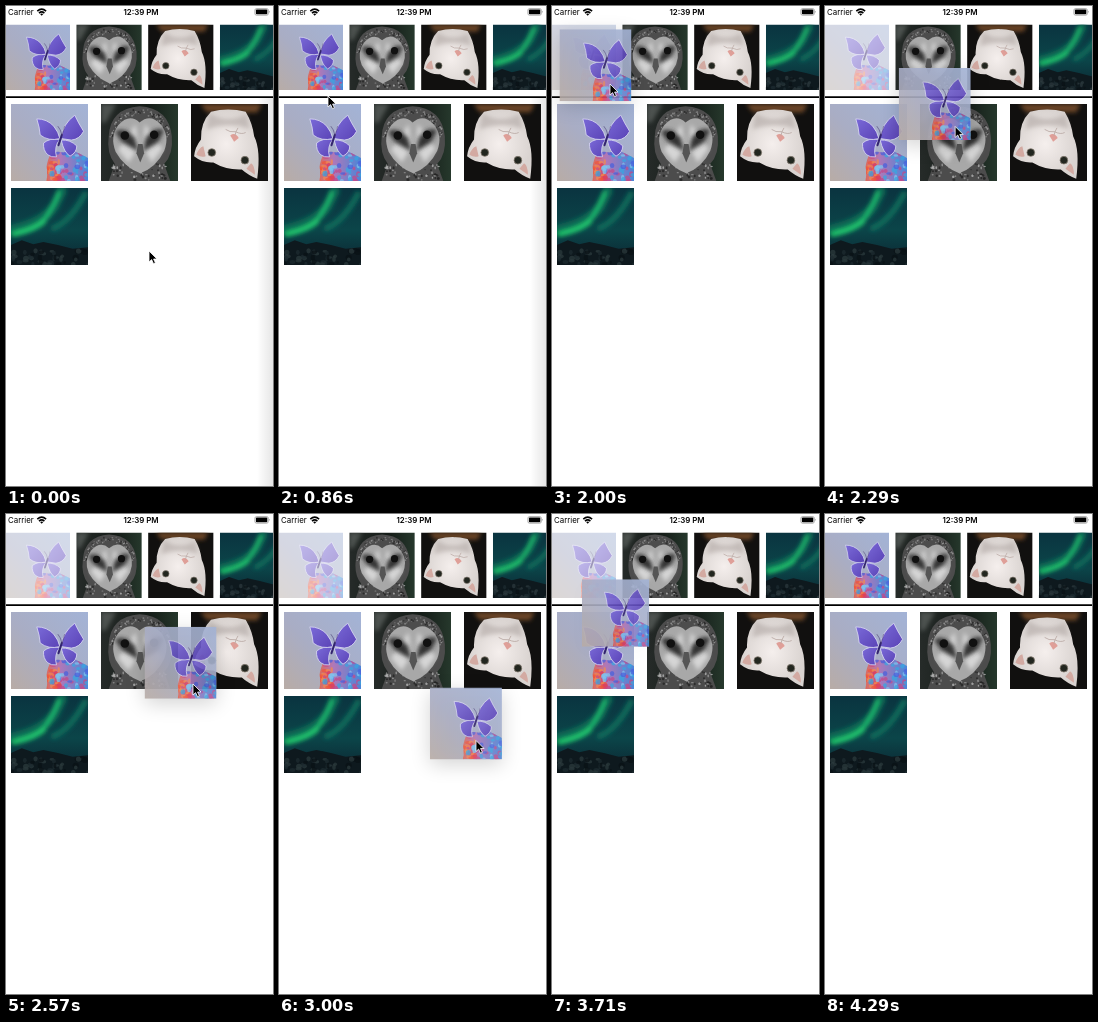
An HTML page that plays this animation: 267 px wide and 480 px high, repeating every 4.44 s.

```html
<!DOCTYPE html>
<html lang="en">
<head>
<meta charset="utf-8">
<title>Drag and drop</title>
<style>
  html, body { margin: 0; width: 100%; height: 100%; overflow: hidden; background: #fff; }
  svg { display: block; width: 100%; height: 100%; }
  text { font: 7.9px Inter, "Liberation Sans", sans-serif; }
  .clock { font-weight: 600; text-anchor: middle; }
</style>
</head>
<body>
<svg viewBox="0 0 267 480">
  <defs>
    <linearGradient id="edge"><stop stop-opacity="0"/><stop offset="1" stop-opacity=".1"/></linearGradient>
    <linearGradient id="haze" x1="1" y1="0" x2="0" y2="1">
      <stop stop-color="#a3b3d6"/><stop offset=".55" stop-color="#a9adc4"/><stop offset="1" stop-color="#b8aca6"/>
    </linearGradient>
    <linearGradient id="wing" x2="1" y2="1"><stop stop-color="#7a6ad8"/><stop offset="1" stop-color="#5a43b6"/></linearGradient>
    <linearGradient id="petal"><stop stop-color="#e8683f"/><stop offset=".4" stop-color="#b078b8"/><stop offset="1" stop-color="#4a86d8"/></linearGradient>
    <linearGradient id="forest"><stop stop-color="#262b29"/><stop offset=".6" stop-color="#141b17"/><stop offset="1" stop-color="#26382c"/></linearGradient>
    <linearGradient id="night" x2="0" y2="1"><stop stop-color="#0a3440"/><stop offset=".55" stop-color="#0b4549"/><stop offset="1" stop-color="#0c2430"/></linearGradient>
    <radialGradient id="fur"><stop stop-color="#f5efed"/><stop offset="1" stop-color="#d9d3d0"/></radialGradient>
    <filter id="soft" x="-50%" y="-50%" width="200%" height="200%"><feGaussianBlur stdDeviation="3"/></filter>
    <filter id="cast" x="-60%" y="-60%" width="220%" height="220%"><feGaussianBlur stdDeviation="10"/></filter>
    <clipPath id="flower"><path d="M46 100Q48 90 46 81Q48 72 51 65Q58 60 68 63Q80 58 88 64L100 70V100z"/></clipPath>

    <symbol id="butterfly" viewBox="0 0 100 100">
      <path fill="url(#haze)" d="M0 0h100v100H0z"/>
      <g clip-path="url(#flower)">
        <path fill="url(#petal)" d="M40 50h60v50H40z"/>
        <g id="petals"></g>
      </g>
      <g transform="translate(8 6) scale(.88 .95)">
        <g fill="url(#wing)" stroke="#d9d8f2" stroke-width="1.2" stroke-linejoin="round">
          <path d="M63 42Q54 52 58 66Q50 67 45 63Q38 57 39 47Q48 40 63 42z"/>
          <path d="M65 43Q78 42 88 51Q88 60 78 65Q69 60 65 43z"/>
          <path d="M63 41Q46 45 34 36Q33 25 29 14Q44 14 54 24Q61 32 63 41z"/>
          <path d="M65 41Q67 21 85 9Q90 19 98 31Q92 42 80 43z"/>
        </g>
        <path stroke="#33246f" stroke-width="3" stroke-linecap="round" d="M66 36L61 50"/>
        <path fill="none" stroke="#46386f" stroke-width=".8" d="M66 36Q64 28 60 24M66 36Q69 30 70 24"/>
      </g>
    </symbol>

    <symbol id="owl" viewBox="0 0 100 100">
      <path fill="url(#forest)" d="M0 0h100v100H0z"/>
      <path fill="#8a908c" opacity=".4" filter="url(#soft)" d="M0 0h20L6 24H0z"/>
      <path fill="#4c4c4c" d="M10 42Q12 6 50 3Q88 5 92 42Q94 66 82 78L90 100H10L18 78Q7 64 10 42z"/>
      <g id="plumage"></g>
      <path fill="#a8a8a8" d="M50 24Q37 12 23 27Q11 42 19 62Q30 82 51 90Q72 82 82 61Q90 41 77 26Q64 12 50 24z"/>
      <path fill="#d6d6d6" filter="url(#soft)" d="M45 26L49 56 36 76 22 60z M57 26L54 56 66 76 80 58z"/>
      <g fill="#333" filter="url(#soft)">
        <path d="M18 36Q30 28 44 44L49 62 28 50z M82 34Q70 28 58 44L54 62 74 50z"/>
      </g>
      <g fill="#111"><circle cx="31" cy="41" r="5.5"/><circle cx="69" cy="40" r="5.5"/></g>
      <path fill="#555" d="M48 52h6l2 12-5 12-5-12z"/>
    </symbol>

    <symbol id="cat" viewBox="0 0 100 100">
      <path fill="#11100f" d="M0 0h100v100H0z"/>
      <path fill="#6b4526" filter="url(#soft)" d="M12 0H92L86 11 20 10z"/>
      <path fill="url(#fur)" d="M26 10Q48 4 71 10Q80 25 82 42Q91 60 86 97Q75 93 66 85Q46 86 29 76Q15 77 4 68Q5 56 13 46Q12 24 26 10z"/>
      <path fill="#d3aaa2" d="M7 66Q10 57 16 55L19 68Q13 70 7 66z M83 92Q83 80 78 77L72 84z"/>
      <path fill="#a89f9b" opacity=".5" filter="url(#soft)" d="M24 12Q45 26 72 14L76 32Q50 23 20 33z"/>
      <g fill="#22261f" stroke="#857c72"><circle cx="27" cy="63" r="5"/><circle cx="70" cy="73" r="5"/></g>
      <path fill="#df9f98" d="M51 41Q57 36 62 44L56 49z"/>
      <path fill="none" stroke="#b5a49f" d="M57 41Q58 36 61 31M58 36Q50 37 45 33M58 36Q66 40 71 37"/>
    </symbol>

    <symbol id="aurora" viewBox="0 0 100 100">
      <path fill="url(#night)" d="M0 0h100v100H0z"/>
      <g fill="none" filter="url(#soft)" stroke-linecap="round">
        <path stroke="#0d6a55" stroke-width="13" d="M2 54Q40 46 56 24L66 4"/>
        <path stroke="#0f6a5a" stroke-width="8" d="M56 52Q78 42 96 8"/>
        <path stroke="#1cbf66" stroke-width="7" d="M4 60Q30 54 42 44"/>
        <path stroke="#22c872" stroke-width="4" d="M10 57Q36 54 47 36T62 6"/>
      </g>
      <path fill="#0e191e" d="M0 74L14 68 29 73 42 70 61 74 80 79 100 77V100H0z"/>
      <g id="rocks"></g>
    </symbol>
  </defs>

  <path fill="#fff" d="M0 0h267v480H0z"/>
  <path id="shade" fill="url(#edge)" d="M251 92h16v388h-16z"/>

  <text x="2" y="8.8">Carrier</text>
  <text class="clock" x="135" y="8.8">12:39 PM</text>
  <g fill="none" stroke="#000" stroke-width="1.6">
    <path d="M31.3 5.2Q35.7 1.2 40.1 5.2M33 7.1Q35.7 4.7 38.4 7.1"/>
    <path fill="#000" stroke="none" d="M35.7 9.7L34.1 8Q35.7 6.8 37.3 8z"/>
  </g>
  <rect x="248.9" y="2.6" width="13.4" height="6.6" rx="1.6" fill="none" stroke="#777" stroke-width=".6"/>
  <rect x="249.9" y="3.6" width="11.4" height="4.6" rx=".8"/>
  <path fill="#777" d="M263 4.8q1.3 1.1 0 2.2z"/>

  <g id="cells"></g>
  <path d="M0 90.3h267v1.8H0z"/>

  <g id="lifted">
    <rect id="shadow" y="5" width="72" height="72" filter="url(#cast)"/>
    <use href="#butterfly" width="72" height="72" opacity=".9"/>
  </g>
  <path id="cursor" stroke="#fff" stroke-width=".8" d="M0 0V11L2.6 8.6 4.5 12.7 6.4 11.8 4.6 8H8z"/>
</svg>
<script>
  const LOOP = 4440, FPS = 7, RELEASE = 3430, LANDED = 4290;
  const HOME = { x: -1.5, y: 18.5, size: 65.5 }, HELD_SIZE = 72;
  const $ = id => document.getElementById(id);

  function add(parent, tag, attrs) {
    const node = document.createElementNS('http://www.w3.org/2000/svg', tag);
    for (const key in attrs) node.setAttribute(key, attrs[key]);
    return parent.appendChild(node);
  }

  // Photo grid: a scrolling strip above, three columns below
  const cell = (name, x, y, size) =>
    add($('cells'), 'use', { href: '#' + name, x, y, width: size, height: size });
  const photos = ['butterfly', 'owl', 'cat', 'aurora'];
  const strip = photos.map((name, i) => cell(name, HOME.x + 71.8 * i, HOME.y, HOME.size));
  photos.forEach((name, i) => cell(name, 5 + 90 * (i % 3), 98 + 84 * Math.floor(i / 3), 77));
  const origin = strip[0];

  // Seeded texture
  let seed = 7;
  const rand = (a, b) => {
    seed = seed * 16807 % 2147483647;
    return a + (b - a) * seed / 2147483647;
  };
  function speckle(id, count, size, colors, place) {
    for (let i = 0; i < count; i++) {
      const [cx, cy] = place();
      const fill = colors[Math.floor(rand(0, colors.length))];
      add($(id), 'ellipse', { cx, cy, rx: rand(.4, 1) * size, ry: rand(.4, 1) * size, fill, opacity: .75 });
    }
  }
  speckle('petals', 25, 4, ['#f0563a', '#f08a52', '#d83c64'], () => [rand(45, 64), rand(72, 100)]);
  speckle('petals', 45, 4, ['#7fc3ee', '#4a62dc', '#38a6e0', '#c24a8a'], () => [rand(52, 100), rand(60, 100)]);
  speckle('plumage', 90, 1.5, ['#8a8a8a', '#a5a5a5', '#222'], () => {
    const a = rand(Math.PI, 2 * Math.PI), r = rand(.8, 1);
    return [51 + 39 * r * Math.cos(a), 44 + 38 * r * Math.sin(a)];
  });
  speckle('plumage', 60, 2, ['#9a9a9a', '#bbb', '#222'], () => [rand(14, 86), rand(78, 99)]);
  speckle('rocks', 45, 4, ['#1d2b30', '#2b393c', '#0a1216'], () => [rand(0, 100), rand(79, 100)]);

  const mix = (a, b, p) => a + (b - a) * p;
  function ramp(t, from, to) {
    const p = Math.min(1, Math.max(0, (t - from) / (to - from)));
    return p * p * (3 - 2 * p);
  }

  // Pointer waypoints, joined by a smooth curve that never overshoots
  const path = [
    { t: 0, x: 143, y: 245 }, { t: 860, x: 49, y: 90 }, { t: 1140, x: 40, y: 67 },
    { t: 1800, x: 40, y: 67 }, { t: 2000, x: 58, y: 78 }, { t: 2570, x: 187, y: 170 },
    { t: 3000, x: 197, y: 226.5 }, { t: RELEASE, x: 150, y: 229 }
  ];
  const slope = (i, k) => path[i] && path[i + 1]
    ? (path[i + 1][k] - path[i][k]) / (path[i + 1].t - path[i].t) : 0;
  function tangent(i, k) {
    const a = slope(i - 1, k), b = slope(i, k);
    return a * b > 0 ? 2 * a * b / (a + b) : 0;
  }
  function pointer(t, k) {
    t = Math.min(t, RELEASE);
    const i = Math.max(0, path.findIndex(p => p.t >= t) - 1);
    const a = path[i], b = path[i + 1], d = b.t - a.t, p = (t - a.t) / d, q = 1 - p;
    return mix(a[k], b[k], ramp(p, 0, 1)) + d * p * q * (q * tangent(i, k) - p * tangent(i + 1, k));
  }

  // 0 = resting in the strip, 1 = held; the release is a critically damped spring
  function lift(t) {
    if (t <= RELEASE) return ramp(t, 1200, 1710);
    const s = (t - RELEASE) * .0088;
    return (1 + s) * Math.exp(-s);
  }

  function draw(t) {
    const k = lift(t), lag = Math.min(t, RELEASE) - 35;
    const x = mix(HOME.x, pointer(lag < 0 ? 0 : lag, 'x') - 46, k);
    const y = mix(HOME.y, pointer(lag < 0 ? 0 : lag, 'y') - 52, k);
    $('lifted').setAttribute('transform',
      `translate(${x} ${y}) scale(${mix(HOME.size, HELD_SIZE, k) / HELD_SIZE})`);
    $('lifted').style.display = k > 0 && t < LANDED ? '' : 'none';
    $('shadow').style.opacity = .17 * k * k;
    origin.style.opacity = 1 - .52 * (ramp(t, 1780, 2000) - ramp(t, 3860, LANDED));
    $('shade').style.opacity = 1 - ramp(t, 860, 1140);
    $('cursor').setAttribute('transform', `translate(${pointer(t, 'x')} ${pointer(t, 'y')})`);
    $('cursor').style.display = t <= RELEASE ? '' : 'none';
  }

  // Each pose is held for a seventh of a second, on 10 ms ticks
  const tick = n => Math.round(n * 100 / FPS) * 10;
  function hold(t) {
    let n = Math.min(30, Math.floor(t * FPS / 1000) + 1);
    while (tick(n) > t) n--;
    return tick(n);
  }

  const start = performance.now();
  function loop() {
    draw(hold((performance.now() - start) % LOOP));
    requestAnimationFrame(loop);
  }
  loop();
</script>
</body>
</html>
```
